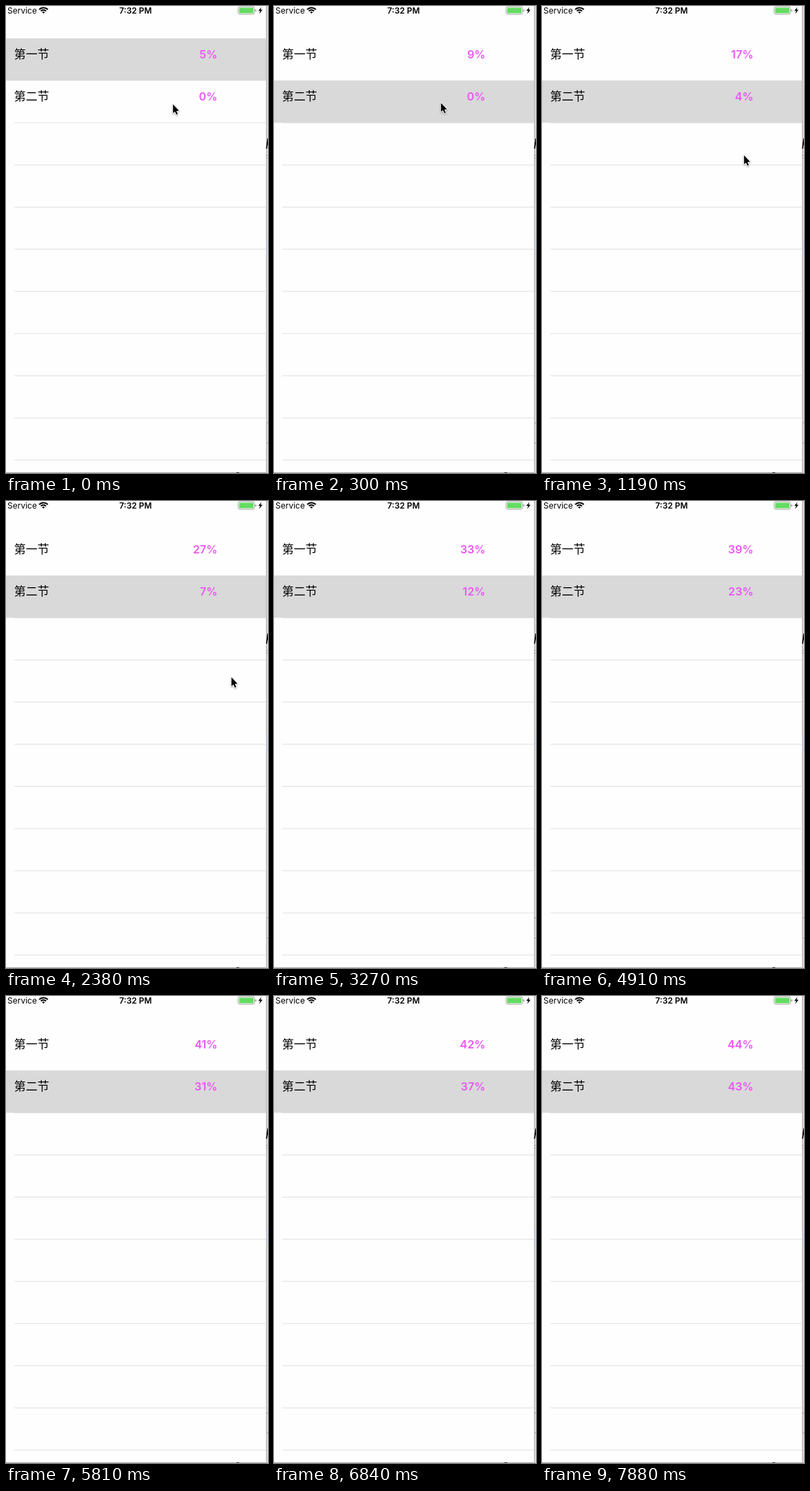
These frames come from a looping animation (381x677 px, 8 s). An HTML page with a canvas:

```html
<!DOCTYPE html>
<html lang="zh">
<head>
<meta charset="utf-8">
<title>Progress list</title>
<style>
html, body { margin: 0; width: 100%; height: 100%; overflow: hidden; background: #fefefe; }
canvas { display: block; }
</style>
</head>
<body>
<canvas id="stage"></canvas>
<script>
const W = 381, H = 677, LOOP = 8000, TICK = 148.7;
const EDGE = 378, ROW = 61.12, TOP = 46.8;
const UI = 'Inter, Roboto, sans-serif';
const CJK = '"Noto Sans CJK SC", "Noto Sans CJK", sans-serif';

const canvas = document.getElementById('stage');
const ctx = canvas.getContext('2d');
const dpr = window.devicePixelRatio || 1;
canvas.width = W * dpr;
canvas.height = H * dpr;
canvas.style.width = W + 'px';
canvas.style.height = H + 'px';

// Key points: [tick, value...], linear in between
const rows = [
  { label: '第一节', keys: [[0, 5], [2, 9], [16, 27], [28, 38], [53, 43.7]] },
  { label: '第二节', keys: [[2, 0], [8, 4], [16, 7], [28, 17], [39, 31], [53, 42.6]] },
];
const pointer = [[0, 242, 142], [2, 242, 140], [4, 242, 140], [8, 293, 216], [11, 327, 255], [17, 327, 255], [20, 382, 296]];

function sample(keys, k) {
  const next = keys.findIndex(key => key[0] > k);
  if (next === 0) return keys[0].slice(1);
  if (next < 0) return keys[keys.length - 1].slice(1);
  const [a, ...from] = keys[next - 1], [b, ...to] = keys[next];
  return from.map((v, i) => v + (to[i] - v) * (k - a) / (b - a));
}

function rect(x, y, w, h, color) {
  ctx.fillStyle = color;
  ctx.fillRect(x, y, w, h);
}

function text(str, x, y, font, color = '#000', align = 'left') {
  ctx.font = font;
  ctx.fillStyle = color;
  ctx.textAlign = align;
  ctx.fillText(str, x, y);
}

function poly(points) {
  ctx.beginPath();
  points.forEach(([x, y]) => ctx.lineTo(x, y));
  ctx.closePath();
}

function wifi(x, y) {
  ctx.strokeStyle = '#000';
  for (const r of [1.4, 5.2, 8.6]) {
    ctx.lineWidth = r < 2 ? 2.8 : 2;
    ctx.beginPath();
    ctx.arc(x, y, r, -Math.PI * 0.76, -Math.PI * 0.24);
    ctx.stroke();
  }
}

function battery() {
  ctx.lineWidth = 1;
  ctx.strokeStyle = '#a2a2a2';
  ctx.beginPath();
  ctx.roundRect(337.5, 1, 24, 11, 2.6);
  ctx.stroke();
  ctx.fillStyle = '#65dc62';
  ctx.beginPath();
  ctx.roundRect(339, 2.5, 21, 8, 1.2);
  ctx.fill();
  rect(362.5, 5, 1.5, 3, '#a2a2a2');
  poly([[371.3, 1.5], [367, 7], [369.6, 7], [368.2, 11.5], [373, 5.6], [370.3, 5.6]]);
  ctx.fillStyle = '#000';
  ctx.fill();
}

function statusBar() {
  text('Service', 2, 11, '12px ' + UI);
  text('7:32 PM', 188.5, 11, '600 12px ' + UI, '#000', 'center');
  wifi(54.5, 11);
  battery();
}

function edges() {
  rect(EDGE, 0, 3, H, '#e2e2e2');
  rect(EDGE, 0, 1, H, '#b8b8b8');
  rect(379, 0, 1, H, '#d0d0d0');
  rect(379, 338, 2, 24, '#cbd6ea');
  for (const y of [604, 633]) rect(379, y, 2, 1, '#a0a0a0');
  for (const y of [216, 220]) rect(379, y, 1, 1, '#777');
  poly([[381, 192], [380, 192], [378, 207], [379.5, 207], [381, 200]]);
  ctx.fillStyle = '#111';
  ctx.fill();
  rect(0, 676, EDGE, 1, '#a8a8a8');
  rect(335, 676, 4, 1, '#222');
}

function list(k) {
  for (let i = 2; i < 11; i++) rect(12, TOP + i * ROW - 0.3, EDGE - 12, 1, '#e0e0e3');
  rect(0, TOP + (k < 1 ? 0 : ROW), EDGE, ROW + 0.3, '#d9d9d9');
  rows.forEach(({ label, keys }, i) => {
    const y = 76 + i * 61;
    text(label, 11.7, y, '17px ' + CJK);
    text(Math.round(sample(keys, k)[0]) + '%', 307.5, y, '600 16.2px ' + UI, '#ea58f3', 'right');
  });
}

function arrow(x, y) {
  ctx.save();
  ctx.translate(x, y);
  poly([[0.8, 0.5], [0.8, 13.5], [3.7, 10.9], [5.8, 15.6], [7.8, 14.7], [5.8, 10.2], [9.6, 9.8]]);
  ctx.lineJoin = 'round';
  ctx.shadowColor = 'rgba(0,0,0,.35)';
  ctx.shadowBlur = 2 * dpr;
  ctx.shadowOffsetY = dpr;
  ctx.lineWidth = 2;
  ctx.strokeStyle = '#fff';
  ctx.stroke();
  ctx.shadowColor = 'transparent';
  ctx.fillStyle = '#000';
  ctx.fill();
  ctx.restore();
}

function draw(t) {
  const k = Math.floor((t + 2) / TICK);
  ctx.setTransform(dpr, 0, 0, dpr, 0, 0);
  rect(0, 0, W, H, '#fefefe');
  statusBar();
  list(k);
  edges();
  if (k < 20) arrow(...sample(pointer, k));
}

function frame(now) {
  draw(now % LOOP);
  requestAnimationFrame(frame);
}
draw(0);
requestAnimationFrame(frame);
</script>
</body>
</html>
```
